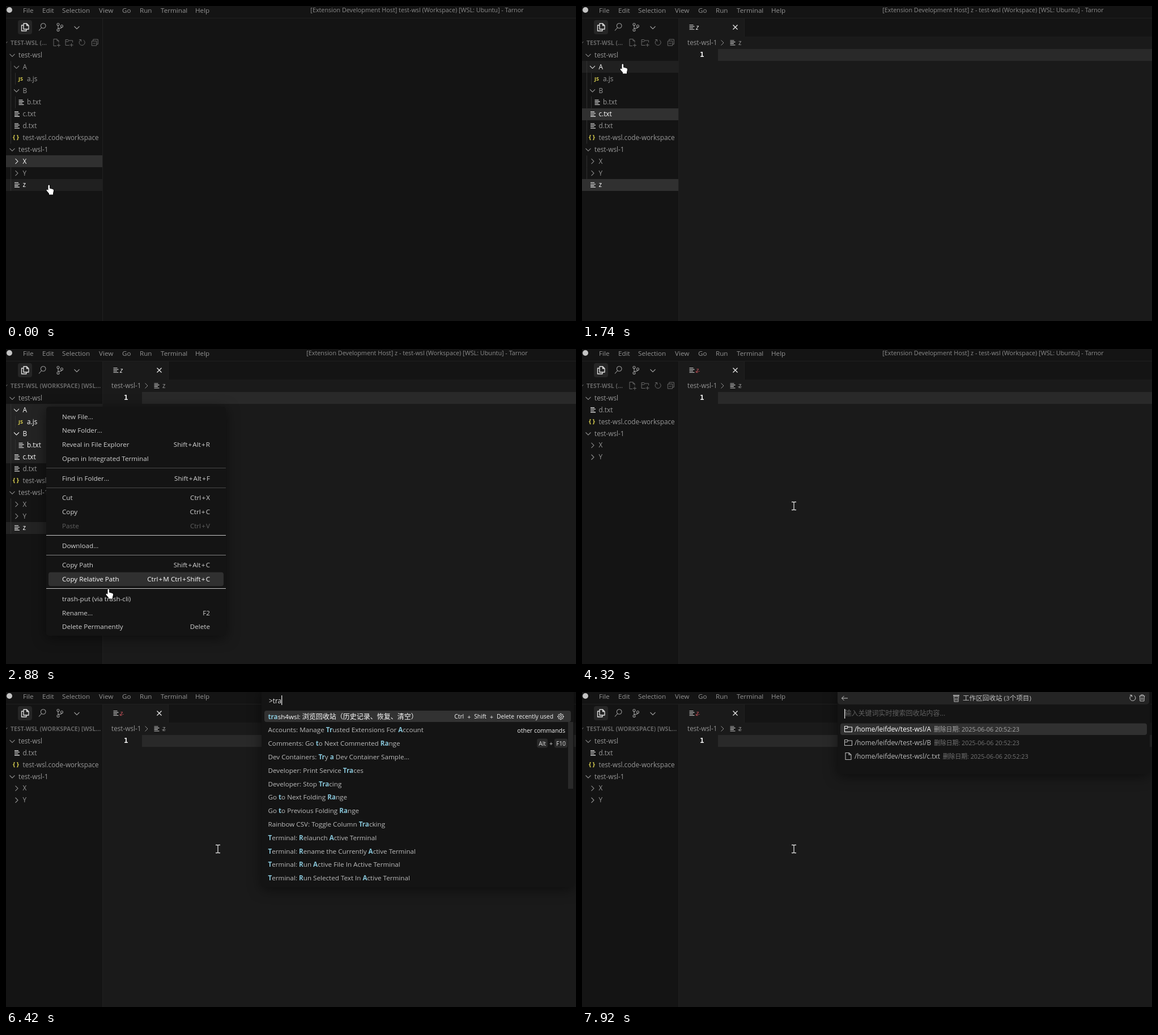
An HTML page with a canvas that plays this animation: 1006x557 px, repeating every 8 s.

```html
<!DOCTYPE html>
<html lang="en">
<head>
<meta charset="utf-8">
<title>Trash demo</title>
<style>
html, body { margin: 0; width: 100%; height: 100%; overflow: hidden; background: #141414; }
canvas { display: block; }
</style>
</head>
<body>
<canvas id="stage" width="1006" height="557"></canvas>
<script>
const ctx = document.getElementById('stage').getContext('2d');
const SANS = '"Open Sans", "Noto Sans CJK SC", "Noto Sans CJK", sans-serif';
const LOOP = 8000, STEP = 60, ROW = 20.87, PICK_ROW = 23.8, SIZE = 11.67;

// Event times in ms
const OPEN_FILE = 660, PICK_C = 1560, PICK_RANGE = 2040, MENU_OPEN = 2400, MENU_CLOSE = 3540,
  FILE_GONE = 3600, TREE_UPDATE = 3780, TO_IBEAM = 3960, PALETTE = 4860, LIST_FILTER = 5880,
  PALETTE_CLOSE = 6540, TRASH_OPEN = 7800;
const KEY_TIMES = [5760, 5880, 6000];

const MOUSE = [
  [0, 75, 316], [720, 75, 316], [1320, 75, 223], [1440, 75, 223], [1560, 74, 192], [1740, 71, 102],
  [2640, 71, 102], [2880, 180, 424], [3240, 261, 431], [3900, 261, 431], [3960, 261.5, 434],
  [4080, 261.5, 434], [4320, 374, 277.5], [LOOP, 374, 277.5]
];

const TREE = [
  [0, 'down', 'test-wsl'], [1, 'down', 'A'], [2, 'js', 'a.js'], [1, 'down', 'B'], [2, 'file', 'b.txt'],
  [1, 'file', 'c.txt'], [1, 'file', 'd.txt'], [1, 'json', 'test-wsl.code-workspace'],
  [0, 'down', 'test-wsl-1'], [1, 'right', 'X'], [1, 'right', 'Y'], [1, 'file', 'z']
];
const TRASHED = ['A', 'a.js', 'B', 'b.txt', 'c.txt', 'z'];

const MENU = [
  [119.5, 'New File...'], [144.3, 'New Folder...'], [168.8, 'Reveal in File Explorer', 'Shift+Alt+R'],
  [193.6, 'Open in Integrated Terminal'], [228.6, 'Find in Folder...', 'Shift+Alt+F'],
  [263.3, 'Cut', 'Ctrl+X'], [288, 'Copy', 'Ctrl+C'], [312.8, 'Paste', 'Ctrl+V'], [347.5, 'Download...'],
  [382.3, 'Copy Path', 'Shift+Alt+C'], [407, 'Copy Relative Path', 'Ctrl+M Ctrl+Shift+C'],
  [441.8, 'trash-put (via trash-cli)'], [466.5, 'Rename...', 'F2'], [491.2, 'Delete Permanently', 'Delete']
];
const MENU_RULES = [[210, '#484848'], [245, '#484848'], [329, '#c8c8c8'], [364, '#808080'], [423, '#c8c8c8']];

const RECENT = [
  'trash4wsl: ', 'Preferences: Open Keyboard Shortcuts', 'Developer: Reload Window', 'JSON: Sort Document',
  'Developer: Startup Performance', 'Preferences: Open Keyboard Shortcuts (JSON)',
  'Preferences: Open Settings (UI)', 'Profiles: Export Profile...', 'Tarnor: Attempt Update',
  'Preferences: Color Theme', 'Preferences: Open Profiles (UI)', 'Python: Select Interpreter',
  'Preferences: Open User Settings (JSON)'
];
// Asterisks enclose the matched letters
const FILTERED = [
  '*tra*sh4wsl: ', 'Accounts: Manage *Tr*usted Extensions For *A*ccount',
  'Comments: Go *t*o Next Commented *Ra*nge', 'Dev Containers: *Tr*y *a* Dev Container Sample...',
  'Developer: Print Service *Tra*ces', 'Developer: Stop *Tra*cing', 'Go *t*o Next Folding *Ra*nge',
  'Go *t*o Previous Folding *Ra*nge', 'Rainbow CSV: Toggle Column *Tra*cking',
  '*T*erminal: *R*elaunch *A*ctive Terminal', '*T*erminal: *R*ename the Currently *A*ctive Terminal',
  '*T*erminal: *R*un *A*ctive File In Active Terminal', '*T*erminal: *R*un Selected Text In *A*ctive Terminal'
];

function text(str, x, y, color, size = SIZE, { style = '', align = 'left', family = SANS } = {}) {
  ctx.font = `${style} ${size}px ${family}`;
  ctx.textAlign = align;
  ctx.fillStyle = color;
  ctx.fillText(str, x, Math.round(y + 4));
  return x + ctx.measureText(str).width;
}

function rich(str, x, y, color) {
  str.split('*').forEach((part, i) => {
    if (part) x = text(part, x, y, i % 2 ? '#86c3d6' : color, SIZE, { style: i % 2 ? 'bold' : '' });
  });
  return x;
}

function box(x, y, w, h, color, radius = 0) {
  ctx.fillStyle = color;
  ctx.beginPath();
  ctx.roundRect(x, y, w, h, radius);
  ctx.fill();
}

function popup(x, y, w, h) {
  ctx.save();
  ctx.shadowColor = 'rgba(0,0,0,.5)';
  ctx.shadowBlur = 22;
  ctx.shadowOffsetY = 4;
  box(x, y, w, h, '#141414', 5);
  ctx.restore();
}

function icon(path, x, y, color = '#8a8a8a', width = 1) {
  ctx.save();
  ctx.translate(x, y);
  ctx.strokeStyle = color;
  ctx.lineWidth = width;
  ctx.lineJoin = 'round';
  ctx.stroke(new Path2D(path));
  ctx.restore();
}

// Icon paths are centred on the origin
const ICON = {
  down: 'M-4.5 -2 L0 2.5 L4.5 -2',
  right: 'M-2 -4.5 L2.5 0 L-2 4.5',
  file: 'M-4.5 -4 H2.5 M-4.5 -1.4 H4.5 M-4.5 1.3 H2 M-4.5 4 H4.5',
  close: 'M-4 -4 L4 4 M4 -4 L-4 4',
  copies: 'M-2.5 -6.5 H3 L6.5 -3 V3.5 H-2.5Z M3 -6.5 V-3 H6.5 M-2.5 -3.5 H-6 V6.5 H2.5 V3.5',
  search: 'M-1.5 1.5 L-6 6.5 M6 -2 A4.3 4.3 0 1 1 -2.6 -2 A4.3 4.3 0 1 1 6 -2',
  branch: 'M-3 -3 V3 M3.5 0 C3.5 3 -3 1 -3 3 M-1 -5 A2 2 0 1 1 -5 -5 A2 2 0 1 1 -1 -5 M-1 5 A2 2 0 1 1 -5 5 A2 2 0 1 1 -1 5 M5.5 -2 A2 2 0 1 1 1.5 -2 A2 2 0 1 1 5.5 -2',
  newFile: 'M0 6 H-5 V-6 H1 L4 -3 V0 M1 -6 V-3 H4 M4 2 V8 M1 5 H7',
  newFolder: 'M0 5 H-6.5 V-5 H-2 L-.5 -3.5 H6 V0 M-6.5 -1.5 H-2 L-.5 -3.5 M4 1.5 V7.5 M1 4.5 H7',
  refresh: 'M-2 -4.6 A5 5 0 1 0 2.5 -4.3 M-5 -5 H-1.5 V-1.5',
  collapse: 'M-3 -2.5 V-5.5 H5.5 V3 H3 M-5.5 -2.5 H3 V5.5 H-5.5Z M-3.5 1.5 H1',
  gear: 'M2 0 A2 2 0 1 1 -2 0 A2 2 0 1 1 2 0 M4.5 0 A4.5 4.5 0 1 1 -4.5 0 A4.5 4.5 0 1 1 4.5 0 M0 -6 V-4 M0 4 V6 M-6 0 H-4 M4 0 H6 M-4.2 -4.2 L-3 -3 M3 3 L4.2 4.2 M4.2 -4.2 L3 -3 M-3 3 L-4.2 4.2',
  back: 'M5.5 0 H-5 M-1 -4 L-5 0 L-1 4',
  bin: 'M-5 -3.5 H5 M-2 -3.5 V-5.5 H2 V-3.5 M-4 -3.5 L-3.5 5.5 H3.5 L4 -3.5 M-1.3 -1 V3.5 M1.3 -1 V3.5',
  folder: 'M-6.5 5 V-5 H-2 L-.5 -3.5 H6.5 V5Z M-6.5 -1 H-2 L-.5 -3.5',
  page: 'M-5 -6 H1 L5 -2.5 V6 H-5Z M1 -6 V-2.5 H5',
  ibeam: 'M-4 -7 H-1 L0 -6 L1 -7 H4 M0 -6 V6 M-4 7 H-1 L0 6 L1 7 H4'
};

function mouseAt(t) {
  const i = MOUSE.findIndex(p => p[0] > t);
  const [t0, x0, y0] = MOUSE[i - 1], [t1, x1, y1] = MOUSE[i];
  const k = (t - t0) / (t1 - t0), e = k * k * (3 - 2 * k);
  return [x0 + (x1 - x0) * e, y0 + (y1 - y0) * e];
}

function drawFrame(t) {
  box(0, 0, 1006, 557, '#141414');
  box(1, 2, 10, 10, '#c4c4c4', 5);
  [['File', 30], ['Edit', 64], ['Selection', 99], ['View', 164], ['Go', 205], ['Run', 236],
    ['Terminal', 273], ['Help', 334]].forEach(([s, x]) => text(s, x, 7.5, '#929292', SIZE));
  const prefix = t >= OPEN_FILE ? 'z - ' : '';
  text(`[Extension Development Host] ${prefix}test-wsl (Workspace) [WSL: Ubuntu] - Tarnor`,
    725.5, 7, '#8c8c8c', 10.8, { align: 'center' });
  box(0, 21, 1006, 1, '#202020');
  box(170, 21, 1, 536, '#202020');
}

function drawSidebar(t, [mx, my], longHeader) {
  box(21, 25, 25, 25, '#262626', 4);
  icon(ICON.copies, 33.5, 37.5, '#e4e4e4', 1.3);
  icon(ICON.search, 64, 37, '#999', 1.1);
  icon(ICON.branch, 95, 37.5, '#999', 1.1);
  icon(ICON.down, 125, 38, '#999', 1.1);

  icon(ICON.down, -2, 65, '#777');
  text(longHeader ? 'TEST-WSL (WORKSPACE) [WSL...' : 'TEST-WSL (...', 8, 64.5, '#646464', 10.5, { style: 'bold' });
  if (!longHeader) ['newFile', 'newFolder', 'refresh', 'collapse']
    .forEach((name, i) => icon(ICON[name], 89 + i * 22.6, 64.5, '#686868'));

  const menuOpen = t >= MENU_OPEN && t < MENU_CLOSE;
  const full = t < TREE_UPDATE;
  const rows = full ? TREE : TREE.filter(r => !TRASHED.includes(r[2]));
  const selected = !full ? [] : t < OPEN_FILE ? ['X'] : t < PICK_C ? ['z'] : t < PICK_RANGE ? ['c.txt', 'z'] : TRASHED;
  const hovered = full && !menuOpen && mx < 170 ? Math.floor((my - 76.4) / ROW) : -1;

  rows.forEach(([depth, kind, name], i) => {
    const y = 86.9 + ROW * i, x = 11 + depth * 7.5;
    const on = selected.includes(name), lit = on || i === hovered;
    if (lit) box(0, Math.round(y - ROW / 2), 170, 21, !on ? '#202020' : menuOpen ? '#232323' : '#303030');
    if (full && depth) box(8, y - ROW / 2, 1, ROW, '#303030');
    if (full && depth === 2) box(16, y - ROW / 2, 1, ROW, '#303030');
    if (kind === 'js') text('JS', x, y - .5, '#d9cf4f', 9, { style: 'bold', align: 'center' });
    else if (kind === 'json') text('{ }', x - 1, y - .5, '#d9cf4f', 10.5, { style: 'bold', align: 'center' });
    else if (kind === 'file') icon(ICON.file, x + 1, y, '#d0d0d0', 1.3);
    else icon(ICON[kind], x, y, lit ? '#e0e0e0' : '#8c8c8c', 1.1);
    text(name, x + 11, y, lit ? '#fff' : '#989898', 11.75);
  });
}

function drawEditor(t) {
  if (t < OPEN_FILE) return;
  const gone = t >= FILE_GONE;
  box(171, 54, 835, 503, '#1a1a1a');
  box(171, 22, 115, 33, '#1a1a1a');
  box(286, 22, 1, 32, '#202020');
  icon(ICON.file, 194, 37.5, '#c8c8c8', 1.2);
  text('z', 201, 38, gone ? '#c05058' : '#f0f0f0', 11.75, { style: 'italic' });
  icon(ICON.close, 270.5, 37.5, '#e8e8e8', 1.3);
  text('test-wsl-1', 186, 65, '#939393', 11.75);
  icon(ICON.right, 247.5, 65, '#939393');
  icon(ICON.file, 266, 65, '#c8c8c8', 1.2);
  text('z', 276, 65, '#939393', 11.75);
  if (gone) {
    box(200, 39, 8, 1, 'rgba(192,80,88,.6)');
    box(275, 66, 7, 1, 'rgba(147,147,147,.6)');
  }
  box(240, 76, 766, 21, '#292929');
  text('1', 208, 86, '#f0f0f0', 12.5, { style: 'bold', family: '"DejaVu Sans Mono", monospace' });
}

function drawMenu(y) {
  popup(71, 102, 317, 405);
  const active = MENU.filter(item => item[0] - 12.4 <= y).pop();
  MENU_RULES.forEach(([ry, color]) => box(71, ry, 317, 1, color));
  MENU.forEach(item => {
    const [cy, label, keys = ''] = item;
    const color = label === 'Paste' ? '#606060' : item === active ? '#fff' : '#d2d2d2';
    if (item === active) box(75, cy - 12.3, 309, 24.6, '#303030', 4);
    text(label, 99, cy, color);
    text(keys.replaceAll('+', '\u200a+\u200a'), 360, cy, color, SIZE, { align: 'right' });
  });
}

// Draws key chips leftwards from their right edge
function keyChips(chords, right, y, bg, color) {
  chords.split(' ').reverse().forEach(chord => {
    chord.split('+').reverse().forEach((key, i) => {
      if (i) {
        text('+', right - 6, y, color, 10.5, { align: 'center' });
        right -= 12;
      }
      ctx.font = `10.3px ${SANS}`;
      const w = ctx.measureText(key).width + 6;
      box(right - w, y - 8.5, w, 16, bg, 3);
      text(key, right - w / 2, y - .5, color, 10.3, { align: 'center' });
      right -= w;
    });
    right -= 10;
  });
}

function caret(t, since, x, y) {
  if (Math.floor((t - since) / 500) % 2 === 0) box(x, y, 1.3, 17, '#e0e0e0');
}

function drawPalette(t) {
  popup(451, -6, 551, 351);
  const pressed = KEY_TIMES.filter(k => k <= t);
  const end = text('>' + 'tra'.slice(0, pressed.length), 464, 15.5, '#e8e8e8', 11.8);
  caret(t, pressed.length ? pressed.at(-1) : PALETTE, end, 6);

  const filtered = t >= LIST_FILTER;
  box(456, 33, 541, 20, '#323232', 4);
  (filtered ? FILTERED : RECENT).forEach((label, i) => {
    const y = 43.5 + PICK_ROW * i, color = i ? '#bcbcbc' : '#fff';
    const x = rich(label, 462.5, y, color);
    if (!i) text('浏览回收站（历史记录、恢复、清空）', x, y, color, 12);
  });
  keyChips('Ctrl+Shift+Delete', 900, 43.5, '#323232', '#f4f4f4');
  text('recently used', 966, 43, '#f4f4f4', 10.4, { align: 'right' });
  icon(ICON.gear, 979, 43.5, '#e8e8e8');
  const chips = (keys, row) => keyChips(keys, 991, 43.5 + PICK_ROW * row, '#2a2a2a', '#d8d8d8');
  if (filtered) {
    text('other commands', 987, 67.5, '#f4f4f4', 10.6, { align: 'right' });
    chips('Alt+F10', 2);
    box(992, 53, 9, 118, '#292929');
  } else {
    chips('Ctrl+M Ctrl+S', 1);
    chips('Ctrl+Shift+R', 2);
    chips('Ctrl+M Ctrl+T', 9);
  }
}

function drawLoading(t, bottom) {
  popup(451, -6, 551, bottom + 6);
  caret(t, 6880, 463, 6);
}

function drawTrash(t) {
  popup(451, -6, 551, 151);
  box(451, -6, 550, 28, '#242424', 5);
  icon(ICON.back, 463.5, 11, '#c8c8c8');
  box(655, 5, 11, 2, '#a0a0a0');
  icon(ICON.bin, 660.5, 11.5, '#909090', 1.5);
  text('工作区回收站 (3个项目)', 672, 11, '#c0c0c0', 11.6);
  icon(ICON.refresh, 972, 10.5, '#c8c8c8');
  icon(ICON.bin, 988.5, 10.5, '#c8c8c8');
  text('输入关键词实时搜索回收站内容...', 463.5, 38, '#606060', 12);
  caret(t, TRASH_OPEN, 463, 30);
  box(456, 55.5, 541, 20.5, '#303030', 4);
  ['A', 'B', 'c.txt'].forEach((name, i) => {
    const y = 66 + 24 * i;
    icon(name === 'c.txt' ? ICON.page : ICON.folder, 470, y - .5, i ? '#b8b8b8' : '#f0f0f0', 1.1);
    const x = text('/home/leifdev/test-wsl/' + name, 481, y, i ? '#bcbcbc' : '#fff', 11.8);
    text('删除日期: 2025-06-06 20:52:23', x + 5, y, i ? '#747474' : '#a8a8a8', 10.8);
  });
}

function drawPointer(t, [x, y]) {
  if (t >= TO_IBEAM) {
    icon(ICON.ibeam, x, y, '#d8d8d8', 1.3);
    return;
  }
  const hand = new Path2D('M3.5 1.5 C3.5 0 6 0 6 1.5 V6.5 L11.5 8 C13 8.5 13.2 9.5 13 11 L12 15 V17.5 H5 V15.5 L.7 10.5 C0 9 1.7 8.3 2.7 9.2 L3.5 10Z');
  ctx.save();
  ctx.translate(x - 4, y);
  ctx.strokeStyle = '#0a0a0a';
  ctx.lineWidth = 1.6;
  ctx.stroke(hand);
  ctx.fillStyle = '#fff';
  ctx.fill(hand);
  ctx.restore();
}

function render() {
  const t = Math.floor(performance.now() % LOOP / STEP) * STEP;
  const within = (from, to) => t >= from && t < to;
  const mouse = mouseAt(t);
  const menu = within(MENU_OPEN, MENU_CLOSE), palette = within(PALETTE, PALETTE_CLOSE);
  const busy = within(6780, 7020), loading = within(7080, 7740), trash = t >= TRASH_OPEN;

  drawFrame(t);
  drawSidebar(t, mouse, menu || palette || busy || loading || trash);
  drawEditor(t);
  if (menu) drawMenu(mouse[1]);
  if (palette) drawPalette(t);
  if (busy) drawLoading(t, 36);
  if (loading) drawLoading(t, 60);
  if (trash) drawTrash(t);
  drawPointer(t, mouse);
  requestAnimationFrame(render);
}
render();
</script>
</body>
</html>
```
